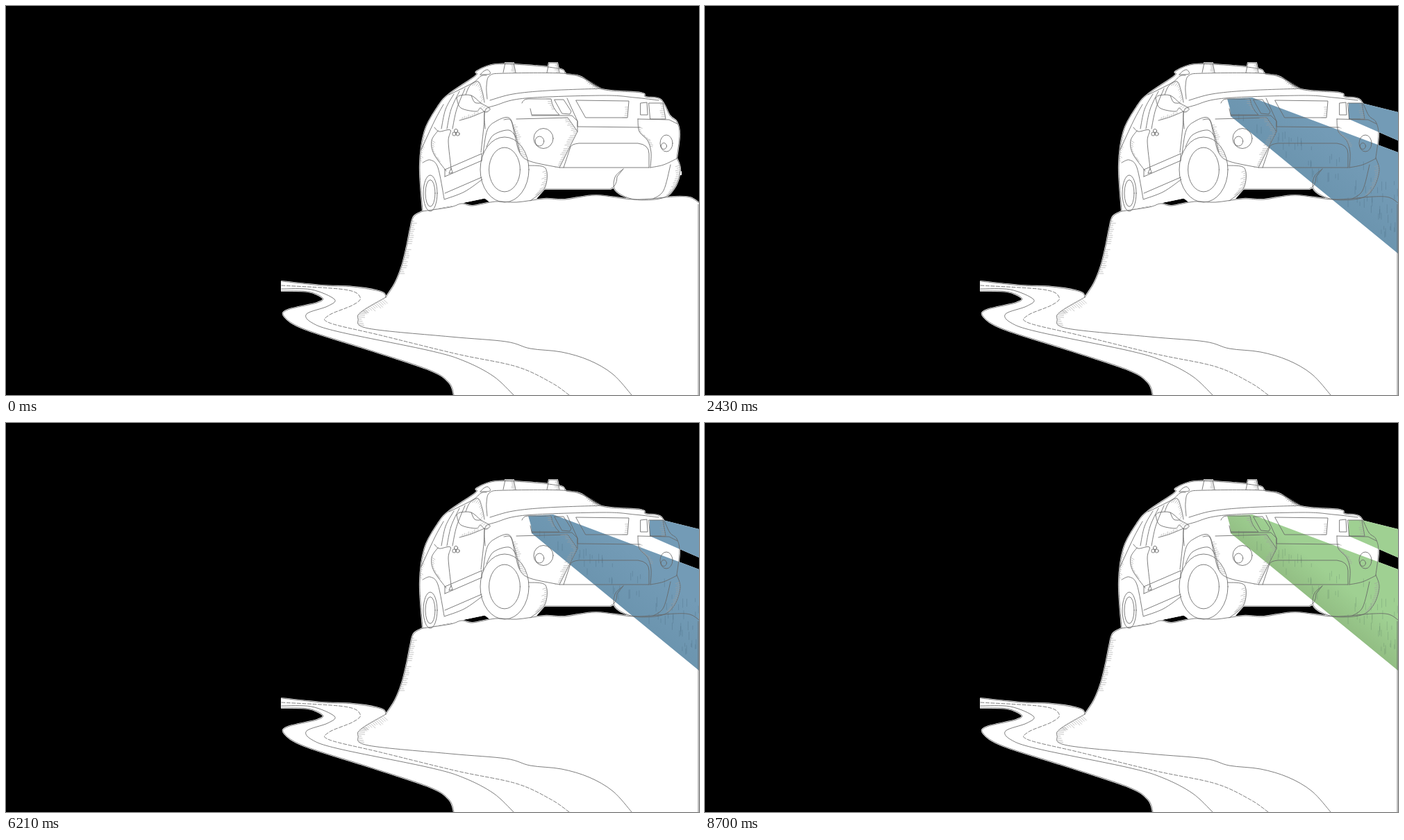
An HTML page for the animation above (8.79 s loop, 998 px wide and 561 px high).

```html
<!DOCTYPE html>
<html lang="en">
<head>
<meta charset="utf-8">
<title>Headlights</title>
<style>
html, body { margin: 0; width: 100%; height: 100%; overflow: hidden; background: #000; }
svg { display: block; width: 100%; height: 100%; }
#body * { fill: #fff; stroke: #fff; stroke-width: 2.2; stroke-linejoin: round; }
#ink * { fill: none; stroke: #666; stroke-width: .85; stroke-linecap: round; stroke-linejoin: round; }
#ink .hatch { stroke: #a0a0a0; stroke-width: .6; }
#ink .dash { stroke-dasharray: 5 2.5; }
#grain path { stroke: #234; stroke-opacity: .2; stroke-width: .7; }
</style>
</head>
<body>
<svg viewBox="0 0 998 561" preserveAspectRatio="none">
  <defs>
    <linearGradient id="greenFill" gradientUnits="userSpaceOnUse" x1="842" y1="240" x2="876" y2="198">
      <stop offset="0" stop-color="#90bb81"/><stop offset="1" stop-color="#9fd092"/>
    </linearGradient>
    <linearGradient id="blueFill" gradientUnits="userSpaceOnUse" x1="842" y1="240" x2="892" y2="179">
      <stop offset="0" stop-color="#6b94ae"/><stop offset="1" stop-color="#739bb6"/>
    </linearGradient>
    <path id="beams" d="M752 134L788 132L998 211V357L757 159L756 148ZM927 140H946L998 153V194L927 163Z"/>
    <clipPath id="lit"><use href="#beams"/></clipPath>
  </defs>
  <g id="body"></g>
  <use id="matte" href="#beams" fill="#fff"/>
  <use id="blue" href="#beams" fill="url(#blueFill)"/>
  <use id="green" href="#beams" fill="url(#greenFill)"/>
  <g id="grain" clip-path="url(#lit)"></g>
  <g id="ink"></g>
</svg>
<script>
const el = id => document.getElementById(id);

function add(group, tag, attrs) {
  const node = document.createElementNS('http://www.w3.org/2000/svg', tag);
  for (const k in attrs) node.setAttribute(k, attrs[k]);
  el(group).append(node);
  return node;
}

let seed = 7;
const rand = () => (seed = seed * 16807 % 2147483647) / 2147483647;

// Smooth curve through a few key points.
function curve(text) {
  const p = text.split(' ').map(s => s.split(',').map(Number));
  const handle = (q, a, b) => q.map((v, j) => v + (b[j] - a[j]) / 6);
  let d = 'M' + p[0];
  for (let i = 0; i < p.length - 1; i++) {
    const a = p[i - 1] || p[i], b = p[i], c = p[i + 1], e = p[i + 2] || c;
    d += `C${handle(b, a, c)} ${handle(c, e, b)} ${c}`;
  }
  return d;
}

const line = (text, cls = '') => add('ink', 'path', { d: curve(text), class: cls });
const poly = d => add('ink', 'path', { d: 'M' + d });
const oval = (cx, cy, rx, ry = rx) => add('ink', 'ellipse', { cx, cy, rx, ry });
const fill = (...parts) => add('body', 'path', {
  d: parts.map((s, i) => i ? curve(s).replace('M', 'L') : curve(s)).join('') + 'Z'
});
const back = text => text.split(' ').reverse().join(' ');

// Pencil strokes (dx, dy) every few pixels along part of a path.
function shade(path, from, to, dx, dy, gap = 3) {
  const size = path.getTotalLength();
  let d = '';
  for (let s = from * size; s < to * size; s += gap) {
    const { x, y } = path.getPointAtLength(s), k = .4 + .6 * rand();
    d += `M${x} ${y}l${dx * k} ${dy * k}`;
  }
  add('ink', 'path', { d, class: 'hatch' });
}

// Landscape
const ledge = '600,296 640,290 656,285 672,288 705,282 735,283 775,278 805,279 850,273 905,279 962,275 985,276 998,284';
const cliff = '600,296 587,304 582,322 577,347 570,375 560,400 547,420';
const roadTop = '397,397 455,403 500,405 540,412 547,420';
const roadLow = '397,411 435,412 456,421 448,428 406,438 401,448 430,466 520,495 610,525 638,543 645,561';
fill(ledge, '998,561 645,561', back(roadLow), roadTop, back(cliff));
line(ledge);
line(roadTop);
line(roadLow);
line('397,408 440,409 473,423 463,433 433,444 441,457 480,470 610,497 660,512 702,534 731,561');
line('397,403 488,409 510,420 500,431 465,446 466,457 540,475 650,502 735,520 785,543 811,561', 'dash');
const bank = line('547,420 513,440 507,451 522,465 640,477 720,484 755,494 800,499 840,511 874,531 901,561');
const edge = line(cliff);
poly('997 286V561');
shade(edge, .16, .4, 8, 0);
shade(edge, .46, .72, 8, 0);
shade(bank, .01, .08, 8, 8);
shade(bank, .08, .13, 11, 1);

// Body outline
const shell = '600,295 596,230 603,180 622,145 638,127 676,101 678,94 705,84 760,86 799,91 807,98 828,102 858,120 914,125 921,131 943,135 956,158 966,167 970,185 966,219';
const tyre = '889,235 877,247 878,266 905,279 945,277 963,262 971,237 966,219';
const belly = '870,264 775,264 760,281 700,284 685,273 650,286 600,295';
fill(shell, back(tyre));
add('body', 'path', { d: 'M966 219L' + belly + 'Z' });
add('body', 'path', { d: 'M971 239h1v4h-1z' });
const side = line(shell);
const far = line(tyre);
poly('776 264H870Q880 260 880 246L889 235');
shade(side, .12, .18, 4, 3);
shade(far, .68, .95, -7, 2);

// Roof lamps and windscreen
for (const x of [716, 779]) {
  const d = `M${x} 96L${x + 3} 82H${x + 15}L${x + 18} 96`;
  add('body', 'path', { d });
  shade(add('ink', 'path', { d }), .65, 1, -6, 0, 2);
}
line('683,99 688,94 694,92 697,98 683,99');
const screen = line('693,134 692,115 697,100 720,97 800,97 829,103 858,119');
line('697,136 730,127 780,122 858,119');
shade(screen, .88, .98, -3, 5);

// Side windows: pillars lean alike, spaced evenly
for (let i = 0; i < 3; i++) {
  const x = 627 + i * 8;
  line(`${x},177 ${x + 6},149 ${x + 18},${127 - i * 4}`);
}
line('638,128 672,111 684,101 692,100');
const pane = line('662,128 668,115 680,109 686,124 689,139');
const sill = line('653,165 670,160 689,152');
const mirror = line('649,133 654,129 670,129 684,140 697,148 690,153 683,147 677,152 655,147 649,133');
line('670,129 675,139 684,140');
shade(pane, .4, .9, -5, 6);
shade(sill, .1, .8, 1, -5);
shade(mirror, .35, .5, -4, 4);

// Doors
line('598,207 617,166 630,142');
const hip = line('600,226 611,222 622,233 631,278');
const door = line('617,175 624,181 640,179 637,195 641,234');
const post = line('622,180 613,194 616,213 634,238');
line('689,153 688,174 684,211');
shade(post, .25, .7, 5, 3);
for (const y of [236, 246, 270]) poly(`632 ${y}L685 ${y - 23}`);
poly('632 236V246M685 213V223');
line('631,279 660,268 686,250');
for (let i = 0; i < 3; i++) {
  const a = i * Math.PI * 2 / 3;
  oval(648 + 3 * Math.sin(a), 183 - 3 * Math.cos(a), 2.6);
}
poly('638 241L641 234L643 240Z');

// Wheels: tyre and rim share a centre
for (const [x, y, rx, ry, rim] of [[611, 270, 10, 26, .7], [718, 236, 35, 47, .64]]) {
  oval(x, y, rx, ry);
  oval(x, y, rx * rim, ry * rim * 1.06);
}
const wall = line('753,230 777,234 776,262 755,281');
line('687,213 693,179 706,166 724,161 732,178 740,211');
line('692,203 702,186 724,179 735,190');
line('932,278 947,266 957,229');
shade(wall, .35, .8, -8, 3);

// Bonnet and lamps
line('690,177 690,151 706,143 748,133 860,129 905,132 940,136');
const lamp = poly('743 140Q745 134 752 134H785Q787 148 797 157H757L755 148');
poly('790 135H803L814 152L812 156L801 155Z');
const grille = poly('821 136L897 137L895 161H835Z');
poly('914 140L923 139L924 157H914Z');
const lamp2 = poly('926 140H946L950 163H928Z');
shade(lamp, .35, .5, -6, 0);
shade(grille, .45, .55, -5, 0);
shade(lamp2, .25, .5, -6, 0);

// Bumper
const horn = line('717,164 727,165 733,188 740,212 755,224 797,233');
const wing = poly('735 163L809 161L823 181L797 233H926');
poly('757 158H815L823 166V181');
poly('808 133L823 166V174L913 175');
poly('803 233L813 203Q815 199 825 198H910Q926 200 926 213V233');
const horn2 = line('910,163 912,181 924,194 929,211 928,233');
poly('910 163L955 164L967 170');
line('928,233 947,229 966,220');
shade(horn, .15, .55, 8, -1);
shade(wing, .25, .55, -9, 1);
shade(horn2, .15, .6, 6, 2);
for (const [x, y, r] of [[774, 191, 14], [951, 198, 9]]) {
  oval(x, y, r, r * .5 + 7.5);
  oval(x - r * .4, y + 4, r * .45, r * .5);
}

// Upright strokes scattered through the light
for (let i = 0; i < 70; i++) {
  const x = 760 + 238 * Math.sqrt(rand());
  const y = 160 + (x - 760) * (.4 + .4 * rand());
  add('grain', 'path', { d: `M${x} ${y}v${-5 - 9 * rand()}` });
}

// Timeline: start, length, colour leaving, colour arriving
const LOOP = 8790, TICK = 30, FADE = 450, FLASH = 120;
const fades = [
  [0, FLASH, null, 'green'],
  [1980, FADE, 'green', 'blue'],
  [3930, FADE, 'blue', 'green'],
  [5760, FADE, 'green', 'blue'],
  [7710, FADE, 'blue', null],
  [8580, FLASH, null, 'green']
];

function show(now) {
  const t = Math.floor(now % LOOP / TICK) * TICK;
  const [start, span, from, to] = fades.filter(f => f[0] <= t).pop();
  const p = Math.min(1, (t - start) / span);
  const level = { green: 0, blue: 0 };
  if (from) level[from] = 1 - p;
  if (to) level[to] = from ? p * p : p;
  const cover = 1 - (1 - level.green) * (1 - level.blue);
  el('green').style.opacity = level.green;
  el('blue').style.opacity = level.blue;
  el('grain').style.opacity = cover;
  el('matte').style.opacity = cover > 0 ? 1 : 0;
}

const begin = performance.now();
function frame() {
  show(performance.now() - begin);
  requestAnimationFrame(frame);
}
show(0);
requestAnimationFrame(frame);
</script>
</body>
</html>
```
